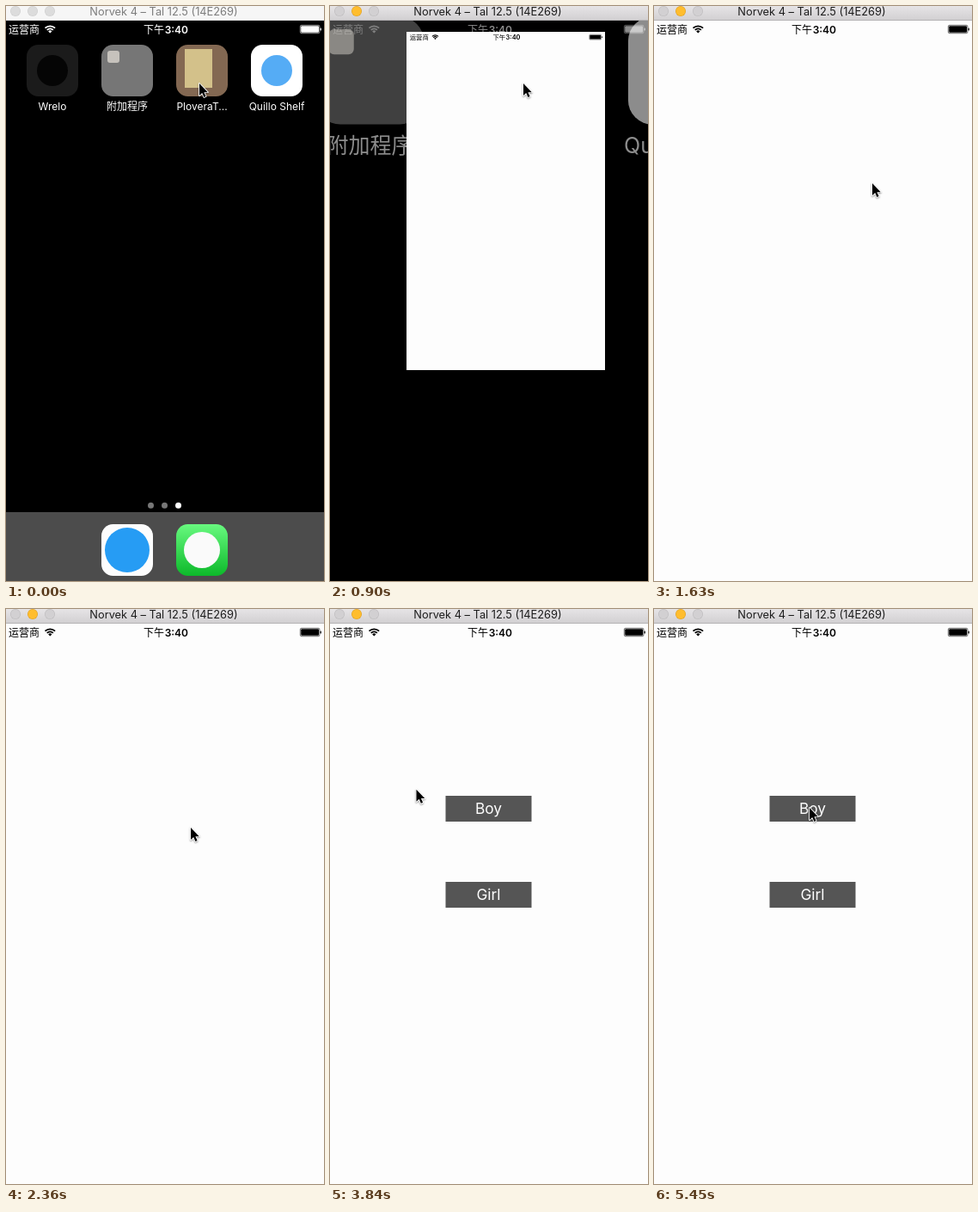
An HTML page with a canvas for the animation above (8000 ms loop, 370 by 668 pixels).

```html
<!DOCTYPE html>
<html lang="zh">
<head>
<meta charset="utf-8">
<style>
  html, body { margin: 0; width: 100%; height: 100%; overflow: hidden; background: #000; }
  canvas { display: block; width: 370px; height: 668px; }
</style>
</head>
<body>
<canvas id="stage"></canvas>
<script>
const W = 370, H = 668, LOOP = 8000;
const FONT = 'Inter, "Noto Sans CJK SC", "Noto Sans CJK", sans-serif';
const canvas = document.getElementById('stage');
const ctx = canvas.getContext('2d');
const ratio = window.devicePixelRatio || 1;
canvas.width = W * ratio;
canvas.height = H * ratio;

const FOCUS = 300, OPEN = 900, BUTTONS = 3240, REST = 5450;
const STEP = (REST - OPEN) / 31;

// The phone screen is slightly wider and taller than the visible stage.
const SCREEN = { x: -3, y: 17, w: 375, h: 667 };
const LAUNCH = { x: 198, y: 45, w: 60, h: 67 };
const APP_COLUMN = 2;
const columnX = i => 24 + 87 * i;

const ARROW = new Path2D('M0 0V14L3.2 11L5.4 16L7.6 15L5.4 10.2H9.8Z');

const lerp = (a, b, p) => a + (b - a) * p;
const mix = (a, b, p) => ({ x: lerp(a.x, b.x, p), y: lerp(a.y, b.y, p) });

function ease(t, from, to) {
  const p = Math.min(1, Math.max(0, (t - from) / (to - from)));
  return p * p * (3 - 2 * p);
}

// Motion advances in even steps, as in a screen recording.
const stepped = t => OPEN + Math.floor((t - OPEN + 10) / STEP) * STEP;

const opening = t => t < OPEN ? 0 : 1 - .457 * Math.exp(-(t - OPEN) / 51);

// Two glides, then a counter-clockwise circling that shrinks onto the first button.
function pointerAt(t) {
  const icon = { x: 225, y: 90 }, side = { x: 254, y: 206 }, middle = { x: 215, y: 254 };
  if (t < BUTTONS) {
    return mix(mix(icon, side, ease(t, 1050, 1630)), middle, ease(t, 1770, 2360));
  }
  const angle = (65 - .364 * (t - BUTTONS)) * Math.PI / 180;
  const size = 1 - ease(t, 4850, REST - 10);
  const center = mix({ x: 178, y: 225 }, { x: 181, y: 231 }, ease(t, 3840, REST - 10));
  return {
    x: center.x + 88 * size * Math.cos(angle),
    y: center.y + 32 * size * Math.sin(angle)
  };
}

function box(x, y, w, h, color, r = 0) {
  ctx.fillStyle = color;
  ctx.beginPath();
  ctx.roundRect(x, y, w, h, r);
  ctx.fill();
}

function disc(x, y, r, color) {
  ctx.fillStyle = color;
  ctx.beginPath();
  ctx.arc(x, y, r, 0, Math.PI * 2);
  ctx.fill();
}

function text(str, x, y, size, color, align = 'center', weight = 400) {
  ctx.font = `${weight} ${size}px ${FONT}`;
  ctx.textAlign = align;
  ctx.fillStyle = color;
  ctx.fillText(str, x, y);
}

function vertical(y0, y1, top, bottom) {
  const g = ctx.createLinearGradient(0, y0, 0, y1);
  g.addColorStop(0, top);
  g.addColorStop(1, bottom);
  return g;
}

function wifi(x, y, color) {
  const from = -Math.PI * .75, to = -Math.PI * .25;
  ctx.fillStyle = ctx.strokeStyle = color;
  ctx.beginPath();
  ctx.moveTo(x, y);
  ctx.arc(x, y, 3, from, to);
  ctx.fill();
  ctx.lineWidth = 1.8;
  for (const r of [5, 8.2]) {
    ctx.beginPath();
    ctx.arc(x, y, r, from, to);
    ctx.stroke();
  }
}

function battery(x, y, color) {
  ctx.strokeStyle = color;
  ctx.lineWidth = .6;
  ctx.beginPath();
  ctx.roundRect(x, y, 22.6, 9.4, 1.6);
  ctx.stroke();
  box(x + .9, y + .9, 20.8, 7.6, color, 1);
  box(x + 23.2, y + 3.2, 1.3, 3, color, .6);
}

function statusBar(color) {
  text('运营商', 3, 31.5, 12, color, 'left');
  wifi(51.3, 31.5, color);
  text('下午', 160, 31.5, 12, color, 'left', 500);
  text('3:40', 212, 31.5, 12, color, 'right', 600);
  battery(342.3, 22.3, color);
}

function titleBar(active) {
  box(0, 0, W, 17, active ? vertical(0, 16, '#e6e4e6', '#d2d0d2') : '#f6f6f6');
  box(0, 16, W, 1, active ? '#b4b2b4' : '#dedede');
  for (let i = 0; i < 3; i++) {
    const lit = active && i === 1, x = 11 + 20 * i;
    disc(x, 6, 6, lit ? '#dfa023' : active ? '#bdbbbd' : '#cecece');
    disc(x, 6, 5.4, lit ? '#ffbd2e' : active ? '#d2d0d2' : '#dcdcdc');
  }
  text('Norvek 4 – Tal 12.5 (14E269)', 183.5, 11, 12.8, active ? '#1c1c1c' : '#7c7c7c');
}

const tile = (x, y, color) => box(x, y, 60, 60, color, 13.5);

function appIcon(column, y, color, markColor, markRadius) {
  tile(columnX(column), y, color);
  disc(columnX(column) + 30, y + 30, markRadius, markColor);
}

function launchIcon(pressed) {
  tile(LAUNCH.x, LAUNCH.y, '#836852');
  box(208, 50, 32, 45, '#d3c18a');
  if (pressed) tile(LAUNCH.x, LAUNCH.y, 'rgba(0,0,0,.5)');
}

function homeScreen(pressed, opened) {
  appIcon(0, 45, '#1b1b1b', '#050505', 18);
  tile(columnX(1), 45, '#767676');
  box(118, 52, 14, 14, '#c6c2bc', 3);
  if (!opened) launchIcon(pressed);
  appIcon(3, 45, '#fff', '#55acf5', 18);

  ['Wrelo', '附加程序', 'PloveraT...', 'Quillo Shelf'].forEach((name, i) => {
    if (!opened || i !== APP_COLUMN) text(name, columnX(i) + 30, 121, 12, '#fff');
  });
  for (let i = 0; i < 3; i++) disc(168.5 + 16 * i, 580.3, 3.5, i === 2 ? '#fff' : '#777');

  box(-3, 588, 375, 96, '#4c4c4c');
  appIcon(1, 602, '#fdfdfd', '#269cf4', 26);
  appIcon(2, 602, vertical(602, 662, '#68f97f', '#0cb92a'), '#fafafa', 21);
}

function home(p, pressed) {
  const scale = 1 + 2 * p, cx = 228, cy = 75;
  ctx.save();
  ctx.globalAlpha = 1 - Math.pow(p, 1.3);
  statusBar('#fff');
  ctx.translate(cx, cy);
  ctx.scale(scale, scale);
  ctx.translate(-cx, -cy);
  homeScreen(pressed, p > 0);
  ctx.restore();
}

function button(label, y) {
  box(134.5, y, 100, 30, '#555');
  text(label, 184.5, y + 21.3, 17.3, '#fff');
}

function appWindow(p, withButtons) {
  const [x, y, w, h] = ['x', 'y', 'w', 'h'].map(k => Math.round(lerp(LAUNCH[k], SCREEN[k], p)));
  box(x, y, w, h, '#fdfdfd');
  ctx.save();
  ctx.translate(x, y);
  ctx.scale(w / SCREEN.w, w / SCREEN.w);
  ctx.translate(-SCREEN.x, -SCREEN.y);
  statusBar('#000');
  if (withButtons) {
    button('Boy', 217);
    button('Girl', 317);
  }
  ctx.restore();
}

function pointer({ x, y }) {
  ctx.save();
  ctx.translate(x, y);
  ctx.lineJoin = 'round';
  ctx.lineWidth = 1.8;
  ctx.strokeStyle = '#fff';
  ctx.shadowColor = 'rgba(0,0,0,.4)';
  ctx.shadowBlur = 2 * ratio;
  ctx.shadowOffsetY = ratio;
  ctx.stroke(ARROW);
  ctx.shadowColor = 'transparent';
  ctx.fillStyle = '#000';
  ctx.fill(ARROW);
  ctx.restore();
}

function draw(time) {
  const t = stepped(time), p = opening(t), active = time >= FOCUS;
  ctx.setTransform(ratio, 0, 0, ratio, 0, 0);
  box(0, 0, W, H, '#000');
  if (p < .99) home(p, active);
  if (p > 0) appWindow(p, t >= BUTTONS);
  titleBar(active);
  pointer(pointerAt(t));
}

const start = performance.now();
function tick() {
  draw((performance.now() - start) % LOOP);
  requestAnimationFrame(tick);
}
tick();
</script>
</body>
</html>
```
